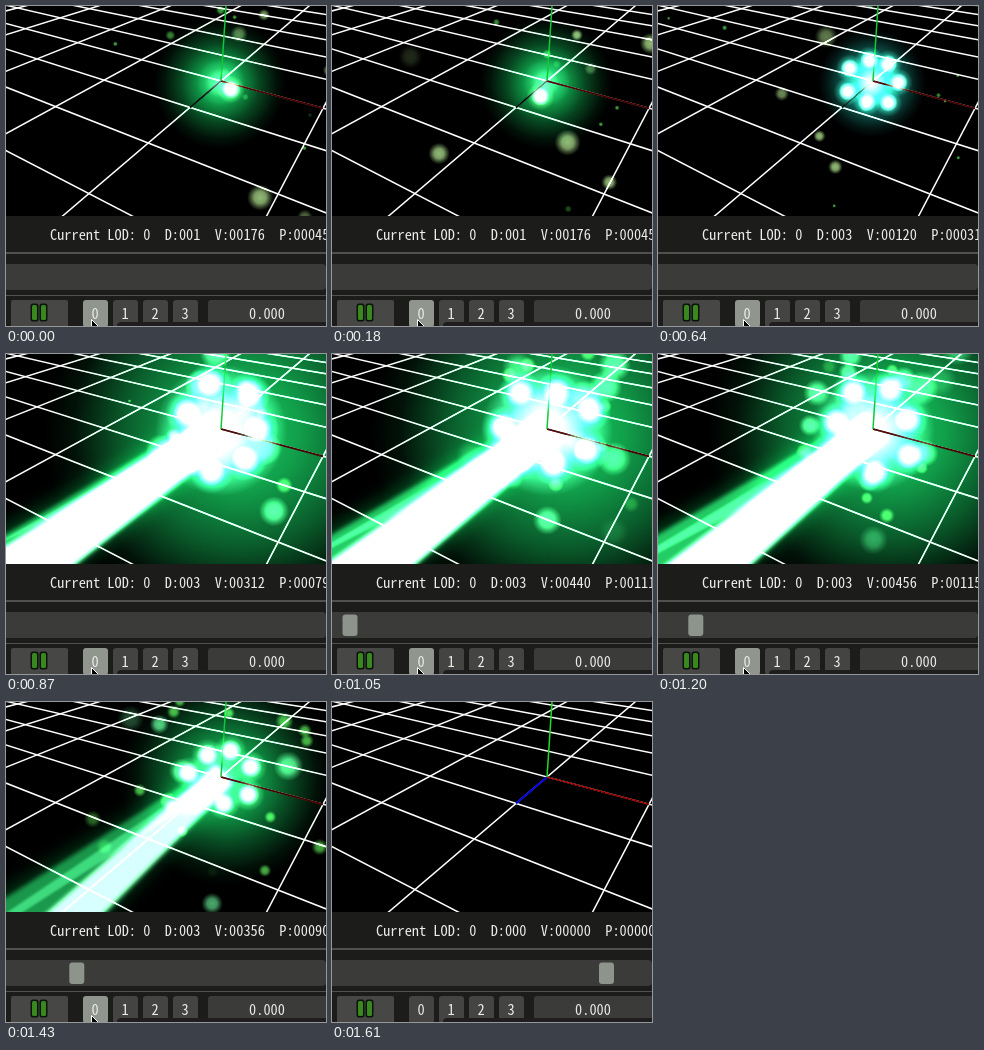
These frames come from a looping animation (320x320 px, 1630 ms). An HTML page with a canvas:

```html
<!DOCTYPE html>
<html lang="en">
<head>
<meta charset="utf-8">
<style>
html, body { margin: 0; width: 100%; height: 100%; overflow: hidden; background: #000; }
canvas { display: block; width: 320px; height: 320px; }
</style>
</head>
<body>
<canvas id="stage" width="320" height="320"></canvas>
<script>
const ctx = document.getElementById('stage').getContext('2d');
const LOOP = 1630, LEAD = 30, TICK = 46.3, LAST = 34;
const CHARGED = 580, TAU = Math.PI * 2;
const mono = '"Noto Sans Mono CJK JP", "Noto Sans Mono", "DejaVu Sans Mono", monospace';
ctx.font = `100px ${mono}`;
const font = `${717 / ctx.measureText('0').width}px ${mono}`;

// Perspective floor: origin, two vanishing points and their weights
const O = [215, 75], VU = [-507, -118], VV = [425, -104], CU = -0.1238, CV = -0.1287;
const floor = (u, v) => [0, 1].map(i =>
  (O[i] + u * CU * VU[i] + v * CV * VV[i]) / (1 + u * CU + v * CV));

const mix = (a, b, k) => a + (b - a) * k;
const mixColor = (a, b, k) => a.map((x, i) => mix(x, b[i], k));
const rgba = (c, a) => `rgba(${c.map(Math.round)},${a})`;
const ramp = (t, a, b) => {
  const k = Math.min(1, Math.max(0, (t - a) / (b - a)));
  return k * k * (3 - 2 * k);
};
// Repeatable random number in 0..1 for one property of one item
const rand = (i, j) => {
  const x = Math.sin(i * 127.1 + j * 311.7) * 43758.5453;
  return x - Math.floor(x);
};

function line(x0, y0, x1, y1, color, width) {
  ctx.strokeStyle = color;
  ctx.lineWidth = width;
  ctx.beginPath();
  ctx.moveTo(x0, y0);
  ctx.lineTo(x1, y1);
  ctx.stroke();
}

function box(x, y, w, h, r, color) {
  ctx.fillStyle = color;
  ctx.beginPath();
  ctx.roundRect(x, y, w, h, r);
  ctx.fill();
}

// Radial gradient; stops are [position, opacity]
function disc(x, y, r, color, stops) {
  const g = ctx.createRadialGradient(x, y, 0, x, y, r);
  for (const [p, a] of stops) g.addColorStop(p, rgba(color, a));
  ctx.fillStyle = g;
  ctx.fillRect(x - r, y - r, 2 * r, 2 * r);
}

function spark(x, y, r, color, a) {
  disc(x, y, r * 1.2, color, [[0, a], [0.45, a * 0.85], [0.75, a * 0.35], [1, 0]]);
}

function drawGrid() {
  const ray = ([x, y], [vx, vy]) =>
    line(vx, vy, vx + (x - vx) * 6, vy + (y - vy) * 6, '#fff', 1.5);
  for (let v = -10; v <= 4; v++) ray(floor(0, v), VU);
  for (let u = -8; u <= 3; u++) ray(floor(u, 0), VV);
}

function drawBlueAxis(empty) {
  line(...O, ...floor(0, 1), empty ? '#0000e0' : '#00100a', 2);
}

function drawAxes(empty) {
  const red = floor(1, 0);
  line(...O, ...red, '#100000', 1.8);
  ctx.setLineDash([3, 1]);
  line(...O, ...red, empty ? '#e00000' : '#6a0000', 1.3);
  ctx.setLineDash([]);
  line(...O, 220, 0, empty ? '#18e020' : '#10c838', 1.5);
}

// How far each phase has come, 0..1
function phases(t) {
  return {
    focus: ramp(t, 540, 630) * (1 - ramp(t, 660, 800)),
    beam: ramp(t, 680, 850) * (1 - ramp(t, 1330, 1600)),
    flood: ramp(t, 680, 860) * (1 - ramp(t, 1080, 1620)),
    life: 1 - ramp(t, 1400, 1610)
  };
}

function drawGlow({ focus, flood, life }) {
  const color = mixColor(mixColor([20, 205, 95], [35, 220, 195], focus), [22, 205, 96], flood);
  const r = mix(66 - 12 * focus, 195, flood);
  disc(214 + 20 * flood, 77, r, color,
    [[0, life], [0.3, 0.78 * life], [0.6, mix(0.34, 0.44, flood) * life], [0.85, 0.09 * life], [1, 0]]);
}

function drawCore({ focus, flood, life }) {
  const heat = Math.max(0.25, 0.7 * focus, flood) * life, r = mix(24, 66, flood);
  disc(215, 76, r, [130, 255, 215], [[0, heat], [0.4, heat * 0.75], [1, 0]]);
  disc(213, 77, r * 0.6, [255, 255, 255], [[0, heat], [0.4, heat * 0.6], [1, 0]]);
}

// Band from the origin towards the viewer; lo and hi are its edges across the axis
function band(lo, hi, near, color, blur) {
  const at = (d, n) => [O[0] - 0.76 * d + 0.65 * n, O[1] + 0.65 * d + 0.76 * n];
  const far = 1.5;
  ctx.filter = `blur(${blur}px)`;
  ctx.fillStyle = color;
  ctx.beginPath();
  ctx.moveTo(...at(-4, -near));
  ctx.lineTo(...at(225 * far, mix(-near, lo, far)));
  ctx.lineTo(...at(225 * far, mix(near, hi, far)));
  ctx.lineTo(...at(-4, near));
  ctx.fill();
  ctx.filter = 'none';
}

function drawBeam(t, { beam }) {
  if (beam <= 0) return;
  const center = -21 + 0.057 * (t - 867), half = 27 * beam;
  const lo = center - half, hi = center + half, near = 16 * beam;
  const edge = Math.min(lo - 8, mix(lo, -58, beam));
  band(edge - 8, hi + 6, near + 6, rgba([0, 150, 60], beam * 0.4), 8);
  band(edge, hi + 3, near + 1, rgba([50, 205, 110], beam * 0.7), 2);
  band(mix(edge, lo, 0.35), mix(edge, lo, 0.6), near * 0.6, rgba([120, 220, 170], beam * 0.4), 1);
  band(lo, hi, near, rgba([255, 255, 255], beam), 2);
}

// White-hot blobs circling the origin: one while charging, then a widening ring
function drawRing(t, { focus, flood, life }) {
  const count = t < CHARGED ? 1 : 7;
  const halo = mixColor([120, 200, 110], [60, 230, 190], Math.max(focus, flood));
  for (let i = 0; i < count; i++) {
    const angle = 0.7 + t * 0.0075 + i * TAU / count;
    const reach = mix(mix(16, 28, ramp(t, 0, 400)), 48, flood) * (0.7 + 0.5 * rand(i, 9));
    const r = mix(9, 14, flood);
    const x = O[0] + reach * Math.cos(angle), y = O[1] + reach * Math.sin(angle);
    spark(x, y, r * 1.3, halo, 0.6 * life);
    spark(x, y, r * 0.85, [240, 255, 240], life);
  }
}

// Sparks drawn in while charging
function drawInflow(t) {
  const life = 420;
  for (let i = 0; i < 46; i++) {
    const born = -400 + i * 22, age = (t - born) / life;
    if (age < 0 || age > 1) continue;
    const angle = TAU * rand(i, 1), reach = (90 + 150 * rand(i, 2)) * (1 - age * age);
    const r = (2 + 9 * rand(i, 3) ** 2) * (born > 300 ? 0.6 : 1);
    const a = Math.min(1, age * 5, (1 - age) * 4) * 0.85;
    spark(O[0] + reach * Math.cos(angle), O[1] + reach * 0.85 * Math.sin(angle), r,
      r < 5 ? [75, 190, 75] : [170, 218, 138], a);
  }
}

// Sparks thrown out by the blast
function drawOutflow(t) {
  const life = 420;
  for (let i = 0; i < 56; i++) {
    const age = (t - 650 - i * 14) / life;
    if (age < 0 || age > 1) continue;
    const angle = TAU * rand(i, 4), reach = 20 + (40 + 100 * rand(i, 5)) * (1 - (1 - age) ** 2);
    const r = 5 + 10 * rand(i, 6) ** 2;
    const a = Math.min(1, age * 6, (1 - age) * 3) * 0.75;
    spark(O[0] + reach * Math.cos(angle), O[1] + reach * Math.sin(angle), r,
      r < 8 ? [95, 225, 85] : [110, 250, 160], a);
  }
}

function drawScene(t, empty) {
  const phase = phases(t);
  const additive = on => { ctx.globalCompositeOperation = on ? 'lighter' : 'source-over'; };
  ctx.save();
  ctx.beginPath();
  ctx.rect(0, 0, 320, 210);
  ctx.clip();
  ctx.fillStyle = '#000';
  ctx.fillRect(0, 0, 320, 210);
  drawGrid();
  if (empty) {
    drawBlueAxis(empty);
    drawAxes(empty);
  } else {
    additive(true);
    drawGlow(phase);
    additive(false);
    drawBlueAxis(empty);
    additive(true);
    drawBeam(t, phase);
    drawCore(phase);
    additive(false);
    drawAxes(empty);
    additive(true);
    drawInflow(t);
    drawOutflow(t);
    drawRing(t, phase);
  }
  ctx.restore();
}

function label(text, x, y, align = 'left') {
  ctx.font = font;
  ctx.textAlign = align;
  ctx.fillStyle = '#ececea';
  ctx.fillText(text, x, y);
}

// Vertex count by tick: [tick, count] points joined by straight lines
const counts = [[12, 80], [13, 120], [18, 312], [22, 440], [27, 468], [33, 240]];
function vertices(tick) {
  if (tick < 12) return 176;
  if (tick >= LAST) return 0;
  const i = counts.findIndex(c => c[0] >= tick);
  if (i < 1) return counts[0][1];
  const [a, from] = counts[i - 1], [b, to] = counts[i];
  return Math.round(mix(from, to, (tick - a) / (b - a)) / 4) * 4;
}

function drawStatus(tick) {
  const digits = (n, len) => String(n).padStart(len, '0');
  const v = vertices(tick), d = tick >= LAST ? 0 : tick < 12 ? 1 : 3;
  label(`Current LOD: 0  D:${digits(d, 3)}  V:${digits(v, 5)}  P:${digits(v && v / 4 + 1, 5)}`, 44, 234);
}

function drawPause() {
  box(5, 294, 57, 30, 2, '#474746');
  for (const x of [25.5, 34.5]) {
    box(x - 1, 297.5, 8, 18, 2.5, '#0c140a');
    box(x + 0.5, 299, 5, 15, 1.5, '#38881f');
  }
}

function drawCursor() {
  ctx.beginPath();
  [[85.5, 313.5], [85.5, 326], [88.5, 323], [95, 323]].forEach(p => ctx.lineTo(...p));
  ctx.closePath();
  ctx.fillStyle = '#000';
  ctx.fill();
  ctx.strokeStyle = '#fff';
  ctx.lineWidth = 1;
  ctx.stroke();
}

function drawPanel(tick) {
  const empty = tick >= LAST, click = tick >= 6 && tick <= 8;
  ctx.fillStyle = '#1c1c1a';
  ctx.fillRect(0, 210, 320, 110);
  ctx.fillStyle = '#50504e';
  ctx.fillRect(0, 246, 320, 2);
  ctx.fillRect(0, 289, 320, 1);
  drawStatus(tick);

  box(-6, 258, 326, 26, 4, '#3b3b3a');
  const knob = empty ? 274.5 : 18 + (tick - 22) * 6.6;
  box(knob - 7.5, 260.5, 15, 21.5, 3, '#8c948c');

  drawPause();
  for (let i = 0; i < 4; i++) {
    const hover = i === 0 && !empty;
    box(77 + 30 * i, 294, 25, 27, 3, hover ? (click ? '#777a74' : '#90968e') : '#444443');
    label(String(i), 89 + 30 * i, 313, 'center');
  }
  box(202, 294, 124, 27, 3, '#3b3b3a');
  label('0.000', 261, 313, 'center');
  box(111, 316, 220, 20, 4, '#1e1e20');
  if (empty) return;
  if (click) {
    ctx.fillStyle = 'rgba(205,185,45,0.85)';
    ctx.beginPath();
    ctx.arc(86, 315, 15, 0, TAU);
    ctx.fill();
  }
  drawCursor();
}

function frame() {
  const now = (performance.now() - start) % LOOP;
  const tick = Math.max(0, Math.floor((now - LEAD) / TICK));
  const t = now < LEAD ? 0 : LEAD + tick * TICK;
  drawScene(t, tick >= LAST);
  drawPanel(tick);
  requestAnimationFrame(frame);
}
const start = performance.now();
frame();
</script>
</body>
</html>
```
